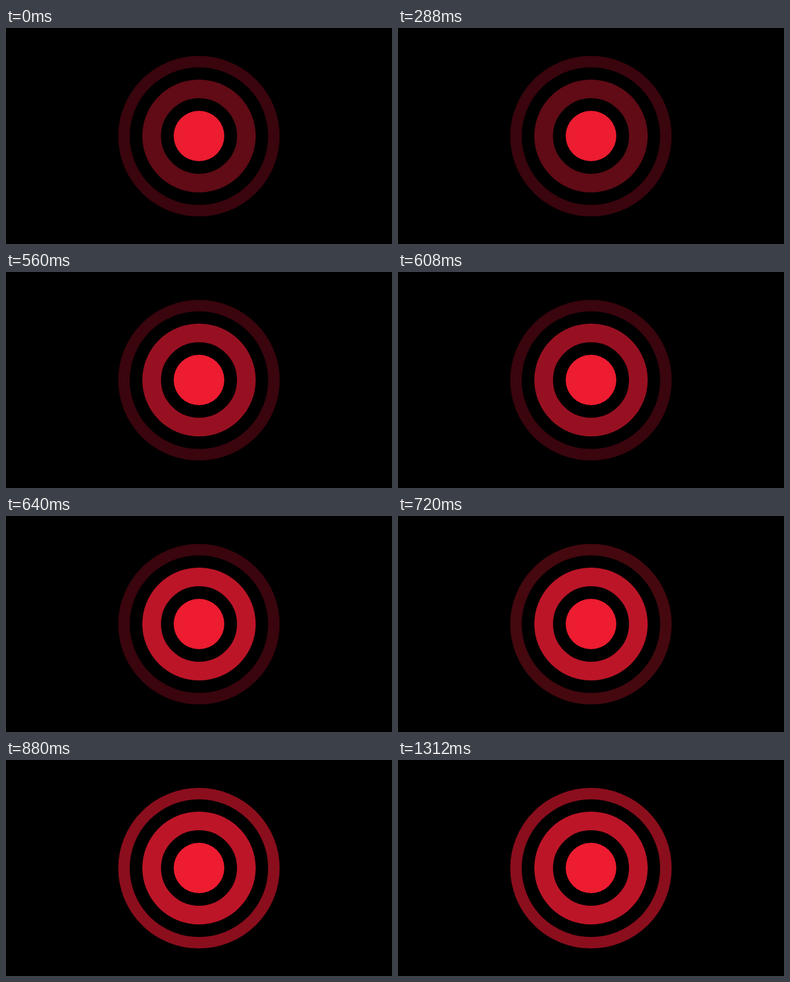
Animation, 640 px wide and 360 px high, one loop 1.6 s. Source, as an HTML page:

```html
<!DOCTYPE html>
<html lang="en">
<head>
<meta charset="utf-8">
<title>Pulse</title>
<style>
  html, body { margin: 0; width: 100%; height: 100%; overflow: hidden; background: #000; }
  svg { display: block; width: 100%; height: 100%; }
  .core { fill: #ed1c30; }
  .ring { fill: none; animation: 1600ms step-end infinite; }
  .inner { stroke-width: 31; animation-name: inner-glow; }
  .outer { stroke-width: 19; animation-name: outer-glow; }

  @keyframes inner-glow {
    0% { stroke: #600b15; }
    30% { stroke: #720d19; }
    35% { stroke: #971021; }
    40%, 100% { stroke: #bc1528; }
  }
  @keyframes outer-glow {
    0% { stroke: #3a050d; }
    45% { stroke: #45080f; }
    50% { stroke: #5e0a15; }
    55%, 100% { stroke: #8b0e1d; }
  }
</style>
</head>
<body>
<svg viewBox="0 0 640 360">
  <circle class="ring outer" cx="319.9" cy="180.3" r="124.3"/>
  <circle class="ring inner" cx="320" cy="180" r="78.5"/>
  <circle class="core" cx="320" cy="180" r="42"/>
</svg>
</body>
</html>
```
